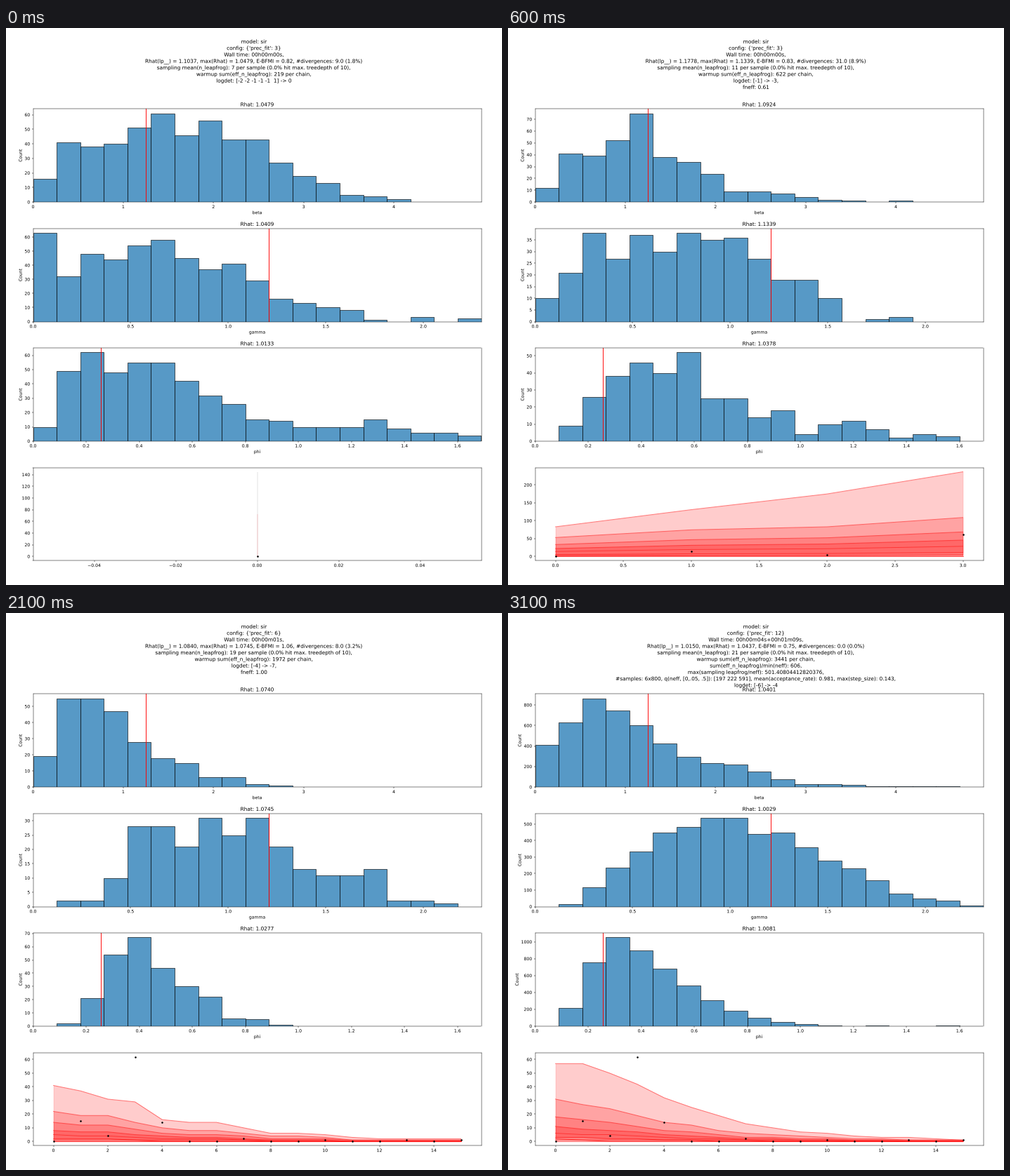
These frames come from a looping animation (706x794 px, 3.6 s). A matplotlib script:

```python
import numpy as np
import matplotlib.pyplot as plt
from matplotlib.animation import FuncAnimation
from matplotlib.patheffects import Normal
from matplotlib.text import Text

W, H, DPI = 706, 794, 44.125
LEFT, WIDTH, TOP, HEIGHT, PITCH = 38.5, 638, 115.3, 132.8, 170.4
BINS = 19
PARAMS = [("beta", 4.97, 1.25), ("gamma", 2.297, 1.207), ("phi", 1.6895, 0.2555)]
OBSERVED = [0, 15, 4, 62, 14, 0, 0, 2, 0, 0, 1, 0, 0, 1, 0, 1]

plt.rcParams["text.hinting"] = "no_hinting"
fig = plt.figure(figsize=(W / DPI, H / DPI), dpi=DPI, facecolor="white")
axes = [fig.add_axes([LEFT / W, 1 - (TOP + k * PITCH + HEIGHT) / H, WIDTH / W, HEIGHT / H])
        for k in range(4)]
lines = [fig.text(0.5, 1 - (21.9 + 9.285 * k) / H, "", fontsize=12, ha="center", va="baseline")
         for k in range(10)]


def header(prec, wall, lp, worst, bfmi, div, leap, warm, *tail):
    return ["model: sir",
            f"config: {{'prec_fit': {prec}}}",
            f"Wall time: {wall},",
            f"Rhat(lp__) = {lp}, max(Rhat) = {worst}, E-BFMI = {bfmi}, #divergences: {div}",
            f"sampling mean(n_leapfrog): {leap} per sample (0.0% hit max. treedepth of 10),",
            f"warmup sum(eff_n_leapfrog): {warm} per chain,",
            *tail]


def pad(counts):
    return np.array(counts + [0] * (BINS - len(counts)), float)


def blend(first, second, total):
    """Histograms halfway between two runs, scaled to a sample count."""
    return [np.round(total * (a / a.sum() + b / b.sum()) / 2) for a, b in zip(first, second)]


def fan(outer, second, ratios):
    """Nine quantile curves, the lower ones as shares of the second."""
    outer, second = np.array(outer, float), np.array(second, float)
    rest = [second * r for r in ratios + (0.1, 0.05, 0.02, 0)]
    if len(outer) == len(OBSERVED):
        rest = [np.round(q) for q in rest]
    return [outer, second] + rest


states = []


def add(text, rhats, hists, curves):
    states.append((text, rhats, hists, curves))


hist_a = [pad([16, 41, 38, 40, 51, 61, 46, 56, 43, 43, 27, 18, 13, 5, 4, 2]),
          pad([63, 32, 48, 44, 54, 58, 45, 37, 41, 29, 16, 13, 10, 8, 1, 0, 3, 0, 2]),
          pad([10, 49, 62, 48, 55, 55, 42, 32, 26, 15, 14, 10, 10, 10, 15, 9, 6, 6, 4])]
hist_b = [pad([12, 41, 39, 52, 75, 38, 34, 24, 9, 9, 7, 4, 2, 1, 0, 1]),
          pad([10, 21, 38, 27, 37, 30, 38, 35, 36, 27, 18, 18, 10, 0, 1, 2]),
          pad([0, 9, 26, 38, 46, 40, 52, 25, 25, 14, 18, 4, 10, 12, 7, 2, 4, 3])]
hist_c = [pad([5, 45, 50, 68, 50, 43, 31, 20, 20, 18, 20, 14, 14, 9, 2, 2, 1, 1]),
          pad([1, 4, 8, 17, 26, 43, 42, 51, 56, 38, 40, 38, 12, 19, 7, 6, 1, 1, 2]),
          pad([0, 27, 77, 93, 87, 53, 35, 14, 11, 8, 0, 5, 1, 3])]
hist_d = [pad([46, 52, 84, 68, 43, 30, 14, 9, 13, 8, 5, 2, 3, 1, 4, 0, 2]),
          pad([0, 1, 24, 16, 30, 28, 51, 36, 53, 38, 31, 17, 25, 16, 7, 4, 4, 2, 1]),
          pad([0, 15, 41, 101, 83, 62, 29, 22, 19, 9, 3])]
hist_e = [pad([19, 55, 55, 47, 28, 18, 15, 6, 6, 2, 1]),
          pad([0, 2, 2, 10, 28, 28, 21, 31, 25, 31, 21, 13, 11, 11, 13, 2, 2, 1]),
          pad([0, 2, 21, 54, 67, 44, 30, 22, 6, 5, 1])]
hist_f = [pad([410, 633, 865, 744, 602, 427, 293, 236, 220, 153, 78, 30, 30, 24, 10, 10, 5, 5, 1]),
          pad([0, 17, 119, 234, 333, 449, 481, 538, 538, 440, 447, 360, 279, 230, 161, 78, 50, 36, 6]),
          pad([2, 215, 760, 1053, 900, 680, 480, 305, 180, 100, 50, 28, 10, 3, 10, 2, 3, 5, 2])]

fan_e = fan([41, 37, 31, 29, 16, 14, 14, 10, 6, 6, 5, 3, 2, 2, 2, 2],
            [22, 19, 19, 14, 10, 8, 8, 6, 4, 4, 3, 1, 1, 1, 1, 1], (0.62, 0.37, 0.23))
fan_f = fan([57, 57, 50, 42, 32, 25, 19, 13, 10, 7, 6, 4, 3, 3, 2, 1],
            [31, 27, 24, 19, 14, 12, 8, 6, 5, 4, 3, 2, 2, 1, 1, 1], (0.58, 0.35, 0.19))

add(header(3, "00h00m00s", "1.1037", "1.0479", "0.82", "9.0 (1.8%)", 7, 219,
           "logdet: [-2 -2 -1 -1 -1  1] -> 0"),
    ("1.0479", "1.0409", "1.0133"), hist_a, [np.array([145.0])])
add(header(3, "00h00m00s", "1.0652", "1.0893", "0.87", "21.0 (4.9%)", 9, 431,
           "logdet: [0] -> -1,", "fneff: 0.71"),
    ("1.0712", "1.0893", "1.0254"), blend(hist_a, hist_b, 426),
    fan([95, 128], [53, 66], (0.62, 0.42, 0.26)))
add(header(3, "00h00m00s", "1.1778", "1.1339", "0.83", "31.0 (8.9%)", 11, 622,
           "logdet: [-1] -> -3,", "fneff: 0.61"),
    ("1.0924", "1.1339", "1.0378"), hist_b,
    fan([83, 131, 175, 237], [53, 74.5, 83, 109], (0.63, 0.42, 0.26)))
add(header(3, "00h00m00s", "1.0211", "1.0833", "1.01", "16.0 (3.9%)", 12, 774,
           "logdet: [-3] -> -4,", "fneff: 0.26"),
    ("1.0833", "1.0172", "1.0038"), hist_c,
    fan([106, 174, 157, 100, 80, 48, 52, 52], [49, 58, 50.5, 38.5, 40, 26.5, 24.5, 22],
        (0.55, 0.33, 0.2)))
add(header(3, "00h00m01s", "1.1078", "1.3139", "0.74", "5.0 (1.3%)", 16, 960,
           "logdet: [-4] -> -4,", "fneff: 0.29"),
    ("1.3139", "1.0548", "1.0406"), hist_d,
    fan([49, 50.5, 36, 35, 23, 20, 18, 9, 9, 7, 4, 3, 3, 2, 2, 1],
        [30, 27, 21.5, 19, 10.5, 11.5, 10, 5, 4, 3, 2, 2, 1.5, 1, 1, 0.5],
        (0.58, 0.36, 0.2)))
add(header(6, "00h00m01s", "1.0840", "1.0745", "1.06", "8.0 (3.2%)", 19, 1972,
           "logdet: [-4] -> -7,", "fneff: 1.00"),
    ("1.0740", "1.0745", "1.0277"), hist_e, fan_e)
add(header(10, "00h00m02s", "1.0427", "1.0586", "0.91", "4.0 (1.3%)", 20, 2716,
           "logdet: [-7] -> -6,", "fneff: 0.84"),
    ("1.0586", "1.0361", "1.0169"), blend(hist_e, hist_f, 300),
    [(a + b) / 2 for a, b in zip(fan_e, fan_f)])
add(header(12, "00h00m04s+00h01m09s", "1.0150", "1.0437", "0.75", "0.0 (0.0%)", 21, 3441,
           "sum(eff_n_leapfrog)/min(neff): 606,",
           "max(sampling leapfrog/neff): 501.40804412820376,",
           "#samples: 6x800, q(neff, [0,.05, .5]): [197 222 591], "
           "mean(acceptance_rate): 0.981, max(step_size): 0.143,",
           "logdet: [-6] -> -4"),
    ("1.0401", "1.0029", "1.0081"), hist_f, fan_f)


def draw_hist(ax, param, counts, rhat):
    name, right, truth = param
    ax.clear()
    step = right / BINS
    ax.bar(np.arange(BINS) * step, counts, step, align="edge", linewidth=1,
           facecolor=(31 / 255, 119 / 255, 180 / 255, 0.75), edgecolor="black")
    ax.axvline(truth, color="red", lw=1.5)
    ax.set_xlim(0, right)
    ax.set_ylim(0, counts.max() * 1.05)
    ax.set_title(f"Rhat: {rhat}")
    ax.set_xlabel(name)
    ax.set_ylabel("Count")


def draw_fan(ax, curves):
    ax.clear()
    n = len(curves[0])
    x = np.arange(n)
    seen = OBSERVED[:n]
    top = max(curves[0].max(), max(seen))
    if n == 1:
        ax.vlines(0, 0, top, color="0.78", lw=0.8)
        ax.vlines(0, 0, top / 2, color=(1, 0.3, 0.35, 0.5), lw=0.8)
        ax.set_xlim(-0.055, 0.055)
    else:
        for k in range(4):
            ax.fill_between(x, curves[-1 - k], curves[k], color="red", alpha=0.2, lw=1)
        for q in curves:
            ax.plot(x, q, color="red", alpha=0.5, lw=1.5)
        ax.set_xlim(-0.05 * (n - 1), 1.05 * (n - 1))
    ax.plot(x, seen, "k.", zorder=5)
    ax.set_ylim(-0.05 * top, 1.05 * top)


def update(i):
    text, rhats, hists, curves = states[(i + 4) // 5]
    for k, line in enumerate(lines):
        line.set_text(text[k] if k < len(text) else "")
    for ax, param, counts, rhat in zip(axes, PARAMS, hists, rhats):
        draw_hist(ax, param, counts, rhat)
    draw_fan(axes[3], curves)
    # outline glyphs keep sub-pixel positions at this small size
    for t in fig.findobj(Text):
        t.set_path_effects([Normal()])
    return []


anim = FuncAnimation(fig, update, frames=36, interval=100, init_func=lambda: [],
                     repeat=True, repeat_delay=0, blit=False)
plt.show()
```
